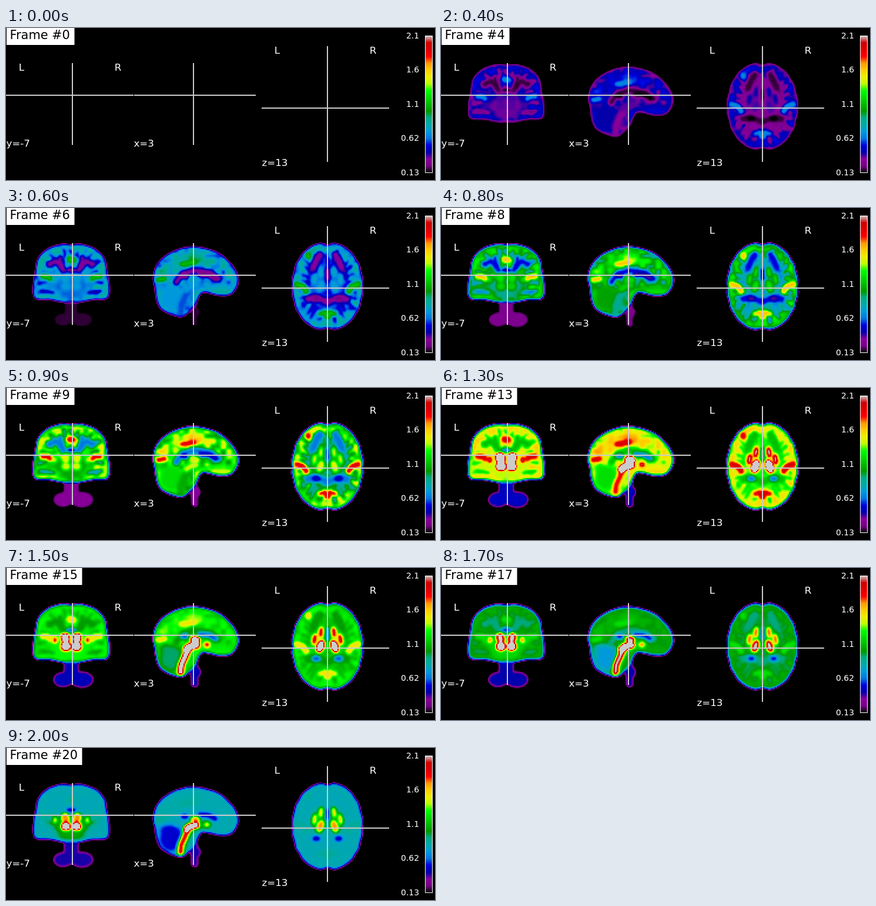
Write an HTML page with a canvas that moves like this. It is 730 by 260 pixels and loops after 2100 ms.

```html
<!DOCTYPE html>
<html lang="en">
<head>
<meta charset="utf-8">
<title>Tracer uptake</title>
<style>
  html, body { margin: 0; width: 730px; height: 260px; overflow: hidden; background: #000; }
  canvas, svg { position: absolute; left: 0; top: 0; width: 730px; height: 260px; }
  canvas { image-rendering: pixelated; }
  text { font-family: "DejaVu Sans", sans-serif; fill: #fff; font-size: 16.67px; }
  .tick { font-size: 13.89px; text-anchor: end; }
  #title { font-size: 20.83px; fill: #000; }
</style>
</head>
<body>
<canvas id="scan" width="365" height="130"></canvas>
<svg viewBox="0 0 730 260">
  <defs><linearGradient id="ramp" x1="0" y1="1" x2="0" y2="0"></linearGradient></defs>
  <path d="M0 115H217M113 60V200M218 115H425M319 60V200M435 137H652M547 31V229" stroke="#ccc" stroke-width="2" fill="none"/>
  <g id="labels"></g>
  <rect x="713.5" y="13.5" width="12" height="234" fill="url(#ramp)" stroke="#fff"/>
  <rect id="plate" x="1" y="0" height="29"/>
  <text id="title" x="6.6" y="19"></text>
</svg>
<script>
const W = 365, H = 130, STEP = 100, COUNT = 21, LOW = 0.13, HIGH = 2.1;
const el = id => document.getElementById(id);
el('plate').style.fill = '#fff';

// Colour scale
const stops = ('000000 770088 880099 0000aa 0000dd 0077dd 0099dd 00aaaa 00aa88 009900 00bb00 ' +
  '00dd00 00ff00 bbff00 eeee00 ffcc00 ff9900 ff0000 dd0000 cc0000 cccccc').split(' ');
const rgb = stops.map(s => [0, 2, 4].map(i => parseInt(s.slice(i, i + 2), 16)));
const palette = Array.from({ length: 256 }, (_, i) => {
  const p = i / 255 * 20, k = Math.min(19, Math.floor(p));
  return rgb[k].map((c, j) => c + (rgb[k + 1][j] - c) * (p - k));
});
el('ramp').innerHTML = stops.map((s, i) => `<stop offset="${i / 20}" stop-color="#${s}"/>`).join('');

// Fixed labels
const label = (s, x, y, kind = '') => `<text class="${kind}" x="${x}" y="${y}">${s}</text>`;
el('labels').innerHTML =
  label('L', 21.8, 73) + label('R', 184.8, 73) + label('y=-7', 0.5, 203) + label('x=3', 217.5, 203) +
  label('L', 456.8, 44) + label('R', 618.8, 44) + label('z=13', 435.5, 236) +
  ['2.1', '1.6', '1.1', '0.62', '0.13'].map((s, i) => label(s, 703, Math.floor(18 + i * 58.5), 'tick')).join('');

// Drawing helpers: every tissue is a soft coverage mask
let g;
function area(pts) {
  const at = i => pts[(i + pts.length) % pts.length];
  const lean = (i, side) => [0, 1].map(k => at(i)[k] + side * (at(i + 1)[k] - at(i - 1)[k]) / 6);
  g.beginPath();
  g.moveTo(...pts[0]);
  pts.forEach((_, i) => g.bezierCurveTo(...lean(i, 1), ...lean(i + 1, -1), ...at(i + 1)));
  g.fill();
}
function line(width, ...pts) {
  g.lineWidth = width;
  g.beginPath();
  pts.forEach(p => g.lineTo(...p));
  g.stroke();
}
function blob(x, y, rx, ry, turn = 0) {
  g.beginPath();
  g.ellipse(x, y, rx, ry, turn, 0, 7);
  g.fill();
}
function both(axis, draw) {
  draw();
  g.save();
  g.translate(2 * axis, 0);
  g.scale(-1, 1);
  draw();
  g.restore();
}
const mirror = (axis, pts) => [...pts, ...pts.slice(1, -1).reverse().map(([x, y]) => [2 * axis - x, y])];
// White matter reaching between the gyri
function spokes(pts, cx, cy) {
  g.globalAlpha = 0.75;
  pts.forEach(([x, y], i) => {
    const at = (k, sway) => [cx + (x - cx) * k + sway, cy + (y - cy) * k];
    const sway = 3 * Math.sin(i * 2.4);
    line(5, at(0.58, 0), at(0.7, sway), at(0.82 + 0.04 * Math.sin(i * 1.7), sway));
  });
  g.globalAlpha = 1;
}
function mask(soft, paint) {
  const c = document.createElement('canvas');
  c.width = W; c.height = H;
  g = c.getContext('2d', { willReadFrequently: true });
  g.scale(0.5, 0.5);
  g.filter = `blur(${soft / 2}px)`;
  g.lineCap = g.lineJoin = 'round';
  paint();
  const d = g.getImageData(0, 0, W, H).data;
  return Float32Array.from({ length: W * H }, (_, i) => d[i * 4 + 3] / 255);
}

// Smooth seeded noise, 0 to 1
const hash = (x, y) => { const s = Math.sin(x * 127.1 + y * 311.7) * 43758.5453; return s - Math.floor(s); };
function noise(x, y) {
  const i = Math.floor(x), j = Math.floor(y), ease = t => t * t * (3 - 2 * t);
  const u = ease(x - i), mix = (a, b, t) => a + (b - a) * t;
  return mix(mix(hash(i, j), hash(i + 1, j), u), mix(hash(i, j + 1), hash(i + 1, j + 1), u), ease(y - j));
}

// Outlines of the three sections
const AX = 111, AZ = 547;
const coronal = mirror(AX, [[111, 64], [93, 63], [70, 71], [55, 87], [51, 108], [47, 132], [50, 154],
  [74, 156], [95, 160], [111, 159]]);
const sagittal = [[251, 118], [259, 95], [282, 76], [318, 67], [358, 76], [385, 99], [395, 124], [384, 146],
  [362, 149], [334, 144], [321, 165], [299, 185], [268, 174], [258, 158], [254, 136]];
const oval = count => Array.from({ length: count }, (_, i) => {
  const a = i / count * 2 * Math.PI, s = Math.sin(a);
  const x = 59.5 * Math.sign(s) * Math.abs(s) ** 0.85 * (1 + 0.012 * Math.cos(18 * a));
  return [AZ + x, 134 - Math.cos(a) * (74 - 4 * Math.exp(-x * x / 40))];
});

// Power-law wash-in up to the peak, exponential wash-out after it
const uptake = (peak, height, power, decay) => step =>
  height * (step < peak ? (step / peak) ** power : Math.exp(-decay * (step - peak)));

const neck = mask(2.4, () => {
  line(26, [111, 150], [111, 185]);
  blob(97, 191, 17, 13);
  blob(129, 191, 20, 14);
  line(13, [320, 165], [321, 198]);
  blob(323, 178, 9, 9);
});
const brain = mask(2.4, () => [coronal, sagittal, oval(72)].forEach(area));
const mottle = brain.map((m, i) => m * 0.65 * noise(i % W / 4.5, Math.floor(i / W) / 4.5) ** 1.6);
const cerebellum = mask(4, () => {
  blob(283, 156, 23, 22);
  blob(276, 140, 16, 8);
});
const white = mask(2.4, () => {
  spokes(coronal.filter(p => p[1] < 150), AX, 116);
  spokes(oval(26), AZ, 134);
  g.globalAlpha = 0.5;
  blob(AZ, 132, 37, 48);
  g.globalAlpha = 1;
  both(AX, () => {
    line(11, [74, 96], [84, 91], [95, 99], [99, 110]);
    line(9, [93, 102], [92, 84]);
    line(5, [60, 142], [82, 145]);
  });
  both(AZ, () => {
    line(13, [534, 80], [526, 92], [523, 104]);
    line(12, [513, 156], [526, 153], [547, 160]);
  });
  line(11, [290, 127], [300, 112], [322, 107], [347, 110], [362, 121]);
});
const core = mask(4, () => {
  blob(AX, 133, 31, 18);
  blob(AX, 149, 24, 8);
  both(AX, () => blob(78, 124, 11, 8));
  both(AZ, () => blob(532, 125, 11, 19, 0.2));
  line(13, [343, 131], [320, 132], [307, 150], [298, 176]);
});
const fluid = mask(2.4, () => {
  blob(AX, 106, 9, 4);
  blob(304, 117, 7, 5);
  line(9, [330, 114], [345, 115], [356, 121]);
  line(6, [AZ, 105], [AZ, 122]);
  both(AZ, () => blob(528, 155, 7, 5));
});
const striatum = mask(2, () => {
  both(AZ, () => {
    blob(536, 110, 4, 9, 0.15);
    blob(525, 122, 4, 9, 0.2);
  });
  both(AX, () => blob(83, 123, 4, 5));
  blob(342, 131, 5, 4);
});
const thalamus = mask(2.2, () => {
  both(AX, () => blob(101, 120, 7, 9, -0.3));
  both(AZ, () => blob(535, 134, 6, 11, 0.3));
  blob(322, 123, 8, 6);
});
const pons = mask(2.4, () => line(10, [311, 136], [304, 153], [298, 166], [297, 178]));
const midbrain = mask(2.4, () => {
  both(AX, () => blob(102, 134, 8, 7));
  line(10, [307, 139], [314, 134], [324, 132]);
});
const active = mask(2.4, () => {
  both(AX, () => line(10, [62, 117], [71, 117], [75, 121]));
  blob(AX, 88, 9, 6);
  line(10, [259, 123], [270, 121]);
  line(9, [299, 96], [320, 93]);
  both(AZ, () => {
    line(11, [495, 130], [504, 133], [511, 142]);
    line(9, [535, 181], [543, 178], [547, 186]);
  });
  blob(514, 82, 5, 6);
  g.globalAlpha = 0.35;
  line(18, [270, 108], [290, 95], [325, 87]);
});

// Painted in order, each over the ones before
const whiteUptake = uptake(13, 1.13, 1.6, 0.05);
const tissues = [
  [neck, uptake(12, 0.48, 1.5, 0.02)],
  [brain, uptake(11, 1.96, 1.28, 0.098)],
  [mottle, whiteUptake],
  [cerebellum, uptake(11, 1.58, 1.3, 0.13)],
  [white, whiteUptake],
  [core, uptake(11.5, 1.5, 1.4, 0.04)],
  [fluid, uptake(12, 0.66, 1.5, 0.05)],
  [striatum, uptake(12, 2.25, 1.5, 0.045)],
  [thalamus, uptake(13, 2.8, 1.7, 0.07)],
  [pons, uptake(15, 2.3, 1.5, 0.04)],
  [midbrain, uptake(13, 2.7, 1.7, 0.015)],
  [active, uptake(11, 2.45, 1.28, 0.115)]
];

const screen = el('scan').getContext('2d');
const picture = screen.createImageData(W, H);

function render(step) {
  const layers = tissues.map(([cover, level]) => [cover, level(step)]);
  for (let i = 0; i < W * H; i++) {
    let v = 0;
    for (const [cover, level] of layers) v += (level - v) * cover[i];
    const n = Math.round((v - LOW) / (HIGH - LOW) * 255);
    picture.data.set(palette[Math.max(0, Math.min(255, n))], i * 4);
    picture.data[i * 4 + 3] = 255;
  }
  screen.putImageData(picture, 0, 0);
  el('title').textContent = 'Frame #' + step;
  el('plate').setAttribute('width', step < 10 ? 115.5 : 128.5);
}

const start = performance.now();
let shown = -1;
function tick(now) {
  const step = Math.floor(Math.max(0, now - start) / STEP) % COUNT;
  if (step !== shown) render(shown = step);
  requestAnimationFrame(tick);
}
tick(start);
</script>
</body>
</html>
```
